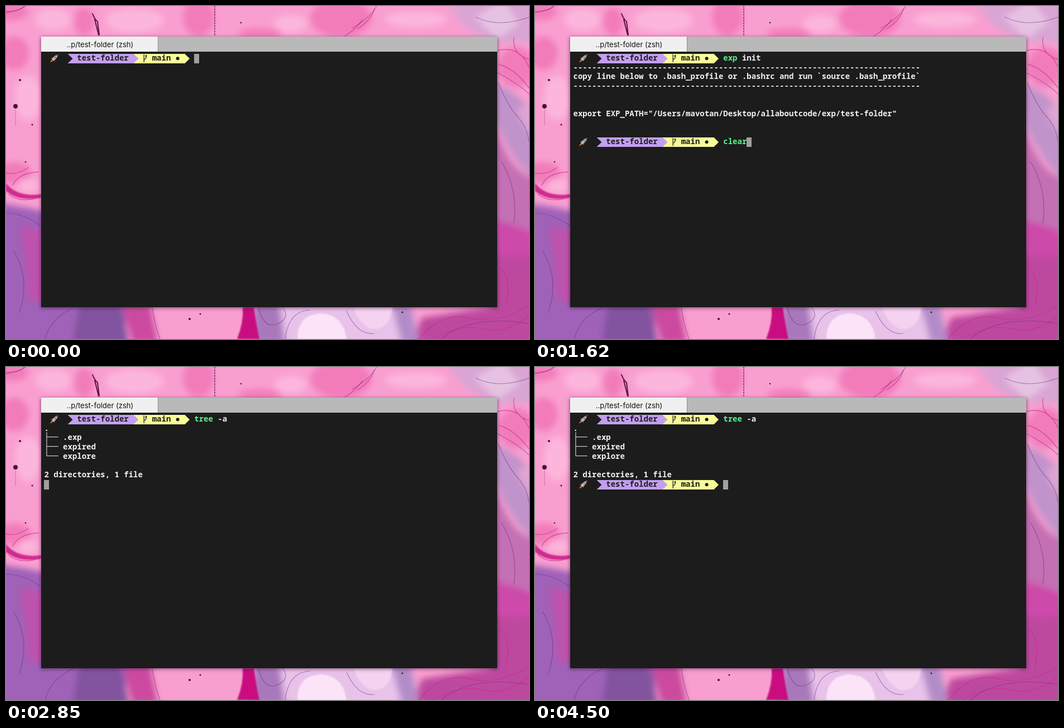
Write an HTML page that moves like this. It is 937 by 598 pixels and loops after 4.53 s.

```html
<!DOCTYPE html>
<html lang="en">
<head>
<meta charset="utf-8">
<title>Terminal</title>
<style>
  html, body { margin: 0; width: 100%; height: 100%; overflow: hidden; background: #f99fd0; }
  svg { display: block; }
  text { white-space: pre; }
  .line { font: 600 14px "Noto Sans Mono", "DejaVu Sans Mono", monospace; fill: #f1f1f0; }
  .dark { fill: #1c1c1c; }
  .tab { font: 13px Inter, "Open Sans", sans-serif; fill: #111; text-anchor: middle; }
  .cmd { fill: #5af78e; }
  .hint { fill: #555; }
  .veins { fill: none; stroke-linecap: round; }
</style>
</head>
<body>
<svg id="stage" width="937" height="598" viewBox="0 0 937 598">
  <defs>
    <filter id="soft" x="-20%" y="-20%" width="140%" height="140%"><feGaussianBlur stdDeviation="6"/></filter>
    <filter id="edge" x="-20%" y="-20%" width="140%" height="140%"><feGaussianBlur stdDeviation="1.2"/></filter>
    <filter id="shade" x="-5%" y="-5%" width="110%" height="110%"><feGaussianBlur stdDeviation="3"/></filter>
    <g id="prompt">
      <path d="M228 0h92.5l8.5 8.5-8.5 8.5h-92.5z" fill="#f8fb98"/>
      <path d="M110.5 0h118l9 8.5-9 8.5h-118l9-8.5z" fill="#c39ff0"/>
      <g transform="translate(86.5 8) rotate(45) scale(.8 1)">
        <path d="M-2 4h4l-2 7z" fill="#f6842c"/>
        <path d="M-3-1l-3 5 3 0zM3-1l3 5-3 0z" fill="#a8302c"/>
        <path d="M0-10q4 4 3 14h-6q-1-10 3-14z" fill="#b9bcc0"/>
        <path d="M0-10q2 2 2.6 4h-5.2q.6-2 2.6-4z" fill="#a04a46"/>
        <circle cy="-2.5" r="1.5" fill="#426a86"/>
      </g>
      <path d="M247.2 1v14M251 3.5v3q0 2-3.8 4M249.6 4.5l1.4-2 1.4 2" fill="none" stroke="#222" stroke-width="1.3"/>
      <circle cx="307.6" cy="8.2" r="3" fill="#1c1c1c"/>
      <text class="line dark" x="127.3" y="12.2">test-folder</text>
      <text class="line dark" x="261.7" y="12.2">main</text>
    </g>
  </defs>

  <!-- marbled paint backdrop -->
  <rect width="937" height="598" fill="#f99fd0"/>
  <g filter="url(#soft)">
    <g fill="#f27cba">
      <ellipse cx="15" cy="85" rx="26" ry="30"/>
      <ellipse cx="10" cy="10" rx="30" ry="16"/>
      <ellipse cx="140" cy="28" rx="18" ry="26"/>
      <ellipse cx="345" cy="20" rx="28" ry="34"/>
      <ellipse cx="600" cy="22" rx="55" ry="34"/>
      <ellipse cx="455" cy="50" rx="40" ry="10"/>
      <ellipse cx="15" cy="300" rx="30" ry="20"/>
      <ellipse cx="915" cy="110" rx="34" ry="36"/>
    </g>
    <g fill="#fcb6dc">
      <ellipse cx="85" cy="24" rx="32" ry="20"/>
      <ellipse cx="230" cy="26" rx="52" ry="22"/>
      <ellipse cx="510" cy="32" rx="30" ry="16"/>
      <ellipse cx="40" cy="165" rx="24" ry="40"/>
      <ellipse cx="735" cy="24" rx="56" ry="14"/>
      <ellipse cx="40" cy="322" rx="18" ry="12"/>
    </g>
    <path d="M785-10h170v75h-70l-60-25z" fill="#d9a5d4"/>
    <path d="M840 20l50-30 30 40-40 30z" fill="#e6c2e2"/>
    <path d="M875 140q40 10 75 60v115q-40-30-75-110z" fill="#c193cb"/>
    <path d="M875 215q30 90 75 95v145h-75z" fill="#c470b4"/>
    <path d="M915 185q15 40 30 50v-60z" fill="#dfa6d4"/>
    <path d="M875 385q30 5 75 25v40q-40 0-75 5z" fill="#cd48aa"/>
    <path d="M870 445q40 10 90 0v165H725l20-50 125-20z" fill="#bd4a9f"/>
    <path d="M-10 355q40 5 85 15v160h140v80H-10z" fill="#9f62b8"/>
    <path d="M25 395q25 5 45 10v125H40q-5-70-15-135z" fill="#bd52ac"/>
    <path d="M130 535h75l15 70h-100z" fill="#82529f"/>
    <path d="M208 535h50l14 70h-45z" fill="#cb4a9f"/>
    <path d="M445 535h55l5 70h-65z" fill="#a878bb"/>
    <path d="M490 535h235l15 70H500z" fill="#e9c2ea"/>
    <path d="M690 535h35l14 70h-30z" fill="#b28cc8"/>
  </g>
  <g filter="url(#edge)">
    <path d="M424 541h20q5 35 10 57h-40q12-30 10-57z" fill="#c90f80"/>
    <path d="M522 598q0-44 42-46 40 2 46 46z" fill="#fbe4f8"/>
    <path d="M622 541h70q-5 45-40 38-20-10-30-38z" fill="#f4d2f0"/>
    <path d="M0 318q20 26 63 20v6q-40 8-63-12z" fill="#d1298f"/>
  </g>
  <g class="veins" stroke="#c92a8a" stroke-opacity=".6" stroke-width="1.4">
    <path d="M0 12q30-4 36-16M607 54q20-12 32-30M660 5q-5 20-30 36"/>
    <path d="M12 322q10-22 46-24M5 338q22 18 58 4M0 300q20 4 40-10"/>
    <path d="M880 80q40-10 57 30M884 105q28 8 53 42M910 56q-4 30 27 40"/>
    <path d="M740 598q40-50 90-38t107-22M765 598q50-28 90-18t82-24M885 470q22 20 10 70"/>
  </g>
  <g class="veins" stroke="#5c2873" stroke-opacity=".45" stroke-width="1.2">
    <path d="M0 10q22 0 35-10M664 0q-10 20-44 40M842 20q40 20 95 0"/>
    <path d="M882 138q16 40 34 60t21 46M888 280q30 50 22 110M881 120q38 20 56 38"/>
    <path d="M0 372q30 0 62 22M14 440q30 50 10 110M70 598q10-38 50-56M262 541q4 30 14 57"/>
    <path d="M452 541q10 40 34 30t10-30M500 598q6-50 44-52M610 548q20 44 50 40M780 598q50-44 157-28"/>
  </g>
  <g class="veins" stroke="#5d1245" stroke-width="2">
    <path d="M155 14q4 10 9 14l3 24M159 24l7 28"/>
    <path d="M374 0v52" stroke-dasharray="2 3" stroke-opacity=".6"/>
    <path d="M17 184v30" stroke-width="1" stroke-opacity=".3"/>
  </g>
  <g fill="#4a1038">
    <circle cx="17" cy="180" r="4"/>
    <circle cx="25" cy="133" r="2"/>
    <circle cx="47" cy="213" r="1.5"/>
    <circle cx="35" cy="280" r="1.3"/>
    <circle cx="329" cy="562" r="2"/>
    <circle cx="348" cy="553" r="1.5"/>
    <circle cx="710" cy="550" r="1.5"/>
    <circle cx="421" cy="30" r="1.3"/>
  </g>

  <!-- window -->
  <rect x="62" y="56" width="819" height="487" fill="#301030" opacity=".5" filter="url(#shade)"/>
  <rect x="63" y="55" width="817" height="486" fill="#1c1c1c"/>
  <rect x="63" y="55" width="817" height="27" fill="#b9b9b9"/>
  <rect x="63" y="55" width="209" height="27" fill="#f0f0f0"/>
  <path d="M272.5 55v27" stroke="#8c8c8c"/>
  <text class="tab" x="168.5" y="73.5">..p/test-folder (zsh)</text>
  <g id="screen"></g>
  <rect id="cursor" width="9" height="17" fill="#a0a0a0"/>
</svg>
<script>
const LOOP = 4530, LEFT = 68.5, TOP = 86, CHAR = 8.4, ROW = 16.7, START = 32;
const screen = document.getElementById('screen');
const cursor = document.getElementById('cursor');
const parts = [], commands = [], moves = [];

const x = col => LEFT + col * CHAR;
const y = row => Math.round(TOP + row * ROW);

function add(tag, attrs, parent = screen) {
  const el = document.createElementNS('http://www.w3.org/2000/svg', tag);
  for (const name in attrs) el.setAttribute(name, attrs[name]);
  return parent.appendChild(el);
}

function show(el, from, to) {
  parts.push({ el, from, to });
  return el;
}

function line(row, col, text, from, to) {
  const el = add('text', { class: 'line', x: x(col), y: y(row) + 12.2 });
  el.textContent = text;
  return show(el, from, to);
}

function prompt(row, from, to) {
  show(add('use', { href: '#prompt', y: y(row) }), from, to);
  moves.push({ from, row, col: START });
}

// Types a command after the prompt, then sends the cursor to the next row.
function command(row, text, { start, step, enter, end, hint = false }) {
  const el = line(row, START, '', start, end);
  const spans = ['cmd', 'arg', 'hint'].map(name => add('tspan', { class: name }, el));
  commands.push({ text, start, step, hint, spans });
  for (let i = 0; i < text.length; i++)
    moves.push({ from: start + i * step, row, col: START + i + 1 });
  moves.push({ from: enter, row: row + 1, col: 0 });
}

function output(row, lines, from, to) {
  lines.forEach((text, i) => text && line(row + i, 0, text, from, to));
}

const CLEAR = 1800, rule = '-'.repeat(74);

prompt(0, 0, CLEAR);
command(0, 'exp init', { start: 60, step: 55, enter: 600, end: CLEAR });
output(1, [
  rule,
  'copy line below to .bash_profile or .bashrc and run `source .bash_profile`',
  rule, '', '',
  'export EXP_PATH="/Users/mavotan/Desktop/allaboutcode/exp/test-folder"'
], 690, CLEAR);
prompt(9, 780, CLEAR);
command(9, 'clear', { start: 1350, step: 65, enter: 1740, end: CLEAR });

moves.push({ from: CLEAR, row: 0, col: 0 });
prompt(0, 1920, LOOP);
command(0, 'tree -a', { start: 2040, step: 75, enter: 2700, end: LOOP, hint: true });
output(1, ['.', '├── .exp', '├── expired', '└── explore', '', '2 directories, 1 file'], 2790, LOOP);
moves.push({ from: 2790, row: 7, col: 0 });
prompt(7, 2880, LOOP);

function draw(t) {
  for (const { el, from, to } of parts)
    el.setAttribute('visibility', t >= from && t < to ? 'visible' : 'hidden');

  for (const { text, start, step, hint, spans } of commands) {
    const n = Math.max(0, Math.min(text.length, Math.floor((t - start) / step) + 1));
    const gap = (text + ' ').indexOf(' ');
    spans[0].textContent = text.slice(0, Math.min(n, gap));
    spans[1].textContent = text.slice(gap, Math.max(n, gap));
    spans[2].textContent = hint ? text.slice(n) : '';
  }

  const { row, col } = moves.filter(m => m.from <= t).pop();
  cursor.setAttribute('x', Math.floor(x(col) + .4));
  cursor.setAttribute('y', y(row));
}

const begin = performance.now();
function tick() {
  draw((performance.now() - begin) % LOOP);
  requestAnimationFrame(tick);
}
tick();
</script>
</body>
</html>
```
